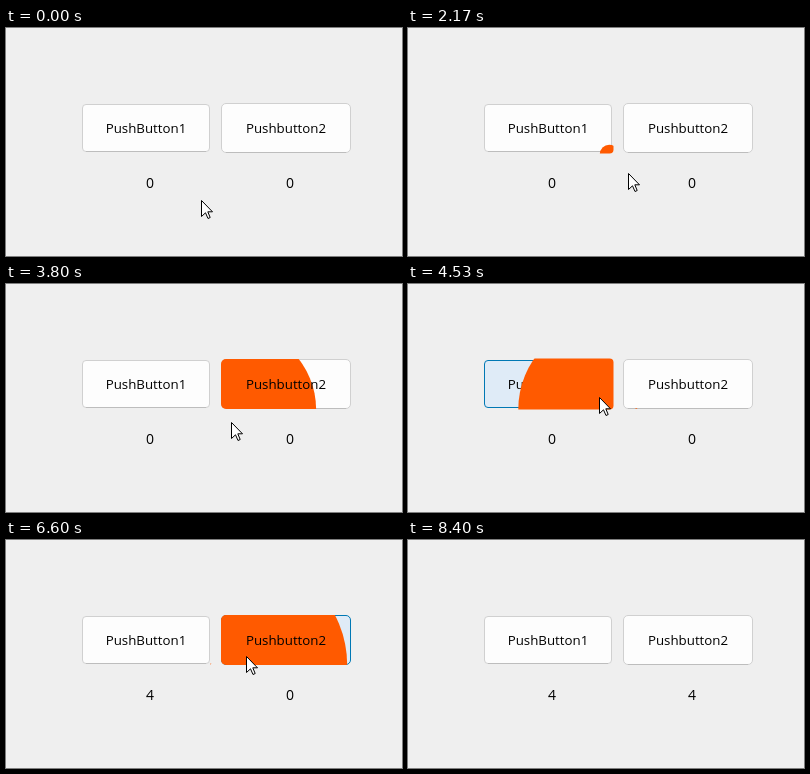
Write an HTML page that moves like this. It is 396x228 px and loops after 9010 ms.

```html
<!DOCTYPE html>
<html lang="en">
<head>
<meta charset="utf-8">
<title>Ripple buttons</title>
<style>
html, body { margin: 0; width: 100%; height: 100%; overflow: hidden; background: #efefef; }
svg { display: block; }
text { font: 13.3px "Open Sans", "Noto Sans", sans-serif; fill: #000; text-anchor: middle; }
.count { font-size: 14px; }
.face { fill: #fdfdfd; stroke: #d0d0d0; }
.edge { stroke: #bdbdbd; }
.hover .face { fill: #dfebf7; stroke: #0078b4; }
.hover .edge { stroke: #0078b4; }
.ripple { fill: #ff5a00; }
</style>
</head>
<body>
<svg width="396" height="228" viewBox="0 0 396 228">
  <clipPath id="clip1"><rect x="74.5" y="74.5" width="131" height="51" rx="4"/></clipPath>
  <clipPath id="clip2"><rect x="215" y="75" width="130" height="50" rx="5"/></clipPath>
  <g id="button1">
    <rect class="face" x="76.5" y="76.5" width="127" height="47" rx="3.5"/>
    <path class="edge" d="M80 123.5H200"/>
    <text x="140" y="105">PushButton1</text>
    <g clip-path="url(#clip1)"><circle class="ripple"/></g>
  </g>
  <g id="button2">
    <rect class="face" x="215.5" y="75.5" width="129" height="49" rx="4.5"/>
    <path class="edge" d="M220 124.5H340"/>
    <g clip-path="url(#clip2)"><circle class="ripple"/></g>
    <text x="280" y="105">Pushbutton2</text>
  </g>
  <text class="count" id="count1" x="144" y="160">0</text>
  <text class="count" id="count2" x="284" y="160">0</text>
  <path id="cursor" fill="#fff" stroke="#000" d="M.5 .5V16.5L4.5 12.8 7 18.5 9.2 17.5 6.8 11.8H11.5Z"/>
</svg>
<script>
const LOOP = 9010, STEP = 10;
const SPAN = 800, FULL = Math.hypot(128, 48), REST = 1.2;
const STALL = [3100, 3800]; // the picture stands still here
const $ = id => document.getElementById(id);

// Pointer stops: arrival, x, y, rest
const stops = [
  [0, 195, 172, 30], [340, 300, 140], [560, 206, 136], [700, 187, 114, 820],
  [1630, 213, 136], [2170, 220, 145], [2310, 190, 115], [2430, 222, 138],
  [2500, 231, 115, 970], [3800, 225, 138], [3890, 205, 137], [4530, 191, 113, 940],
  [5640, 206.5, 125], [5930, 230, 130], [6600, 240, 116, 1170],
  [7785, 222, 141], [7990, 196, 100], [8050, 176, -22]
];

const buttons = [
  { id: 1, left: 75, clicks: [4870, 5130, 5300, 5470] },
  { id: 2, left: 215, clicks: [6770, 6970, 7130, 7370] }
];

function pointer(t) {
  const i = stops.findLastIndex(s => s[0] <= t);
  const [t0, x0, y0, rest = 0] = stops[i];
  const [t1, x1, y1] = stops[i + 1] || [LOOP, x0, y0];
  const k = Math.max(0, (t - t0 - rest) / (t1 - t0 - rest));
  return { x: x0 + (x1 - x0) * k, y: y0 + (y1 - y0) * k };
}

function easeOut(from, to, age) {
  const left = 1 - Math.min(age / SPAN, 1);
  return to + (from - to) * left * left;
}

const radius = (c, t) => easeOut(c.from, c.inside ? FULL : 0, t - c.at);

// Each time the pointer enters or leaves, a ripple starts from where it is
function findCrossings({ left }) {
  const found = [];
  let last = { inside: false, from: 0, at: 0 };
  for (let at = 0; at < LOOP; at += STEP) {
    const { x, y } = pointer(at);
    const inside = x >= left && x <= left + 130 && y >= 75 && y <= 125;
    if (inside === last.inside) continue;
    last = { at, inside, x, y, from: radius(last, at) };
    found.push(last);
  }
  return found;
}

function drawButton(b, t) {
  const c = b.crossings.findLast(c => c.at <= t);
  const group = $("button" + b.id), ripple = group.querySelector("circle");
  group.classList.toggle("hover", Boolean(c && c.inside));
  ripple.setAttribute("cx", c ? c.x : 0);
  ripple.setAttribute("cy", c ? c.y : 0);
  ripple.setAttribute("r", c ? Math.max(radius(c, t), REST) : 0);
  $("count" + b.id).textContent = b.clicks.filter(at => at <= t).length;
}

function drawCursor(t) {
  const { x, y } = pointer(t);
  $("cursor").setAttribute("transform", `translate(${Math.round(x)} ${Math.round(y)})`);
}

buttons.forEach(b => b.crossings = findCrossings(b));
const start = performance.now();
function frame() {
  let t = (performance.now() - start) % LOOP;
  if (t >= STALL[0] && t < STALL[1]) t = STALL[0];
  buttons.forEach(b => drawButton(b, t));
  drawCursor(t);
  requestAnimationFrame(frame);
}
frame();
</script>
</body>
</html>
```
